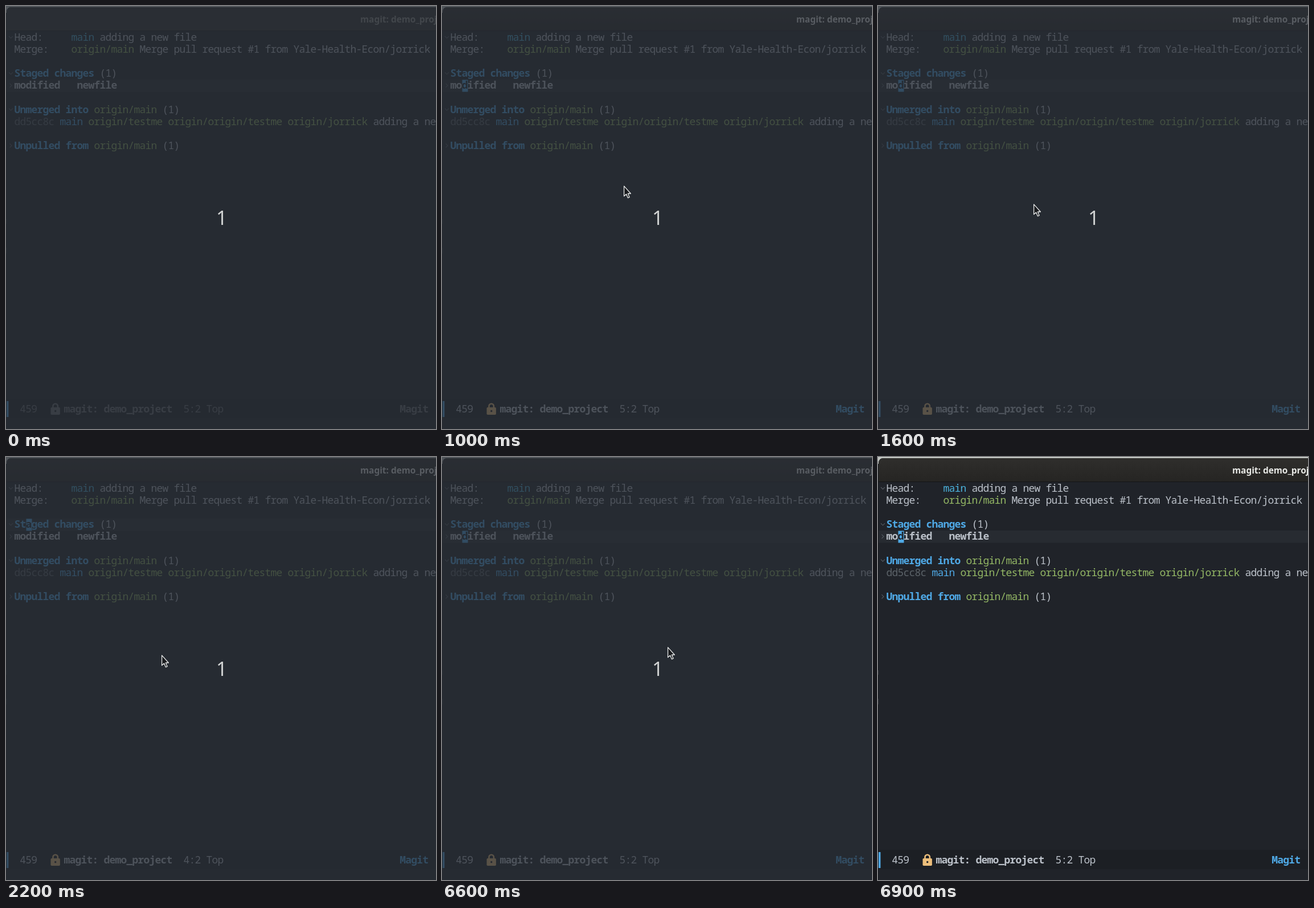
These frames come from a looping animation (755x742 px, 8000 ms). An HTML page:

```html
<!DOCTYPE html>
<html lang="en">
<head>
<meta charset="utf-8">
<title>magit status</title>
<style>
  html, body { margin: 0; width: 100%; height: 100%; overflow: hidden; background: #16191d; }
  svg { display: block; width: 755px; height: 742px; }
  text { white-space: pre; font: 500 18px "Noto Sans Mono", "DejaVu Sans Mono", monospace; letter-spacing: -.8px; }
  text.bold { font-weight: 700; }
  text.title { font: 600 15.4px "Noto Sans", "Open Sans", sans-serif; letter-spacing: 0; }
  text.count { font: 34px "Noto Sans", "Open Sans", sans-serif; letter-spacing: 0; }
</style>
</head>
<body>
<svg id="stage" viewBox="0 0 755 742" xmlns="http://www.w3.org/2000/svg">
  <defs>
    <linearGradient id="bar" x2="0" y2="1">
      <stop offset="0" stop-color="#2f2e2c"/>
      <stop offset="1" stop-color="#262523"/>
    </linearGradient>
  </defs>
  <rect width="755" height="742" fill="#16191d"/>
  <rect width="755" height="12" fill="#c4c8c4"/>
  <path d="M1 742V11Q1 2 10 2H755V742Z" fill="#202329"/>
  <path d="M1 43V11Q1 2 10 2H755V43Z" fill="url(#bar)"/>
  <path id="unfocused" d="M1 43V11Q1 2 10 2H755V43Z" fill="#31312f"/>
  <rect x="1" y="43" width="754" height="1" fill="#141517"/>
  <path d="M0 374v8M0 424v10" stroke="#4a4e52"/>
  <rect id="line" x="1" y="129" width="754" height="21.5" fill="#272b31"/>
  <rect x="1" y="689" width="754" height="34" fill="#1c1f24"/>
  <rect x="1" y="693" width="3.5" height="28" fill="#4fa9e6"/>
  <g id="fringe" fill="none" stroke="#565c63" stroke-width="1.1"></g>
  <g id="text"></g>
  <rect id="cursor" x="35.5" y="129.5" width="10" height="21" fill="#4fa9e6"/>
  <text id="under" class="bold" x="34.6" fill="#202329"></text>
  <g id="lock">
    <path d="M82.5 706V702a4.2 4.2 0 0 1 8.4 0V706" fill="none" stroke="currentColor" stroke-width="2.6"/>
    <rect x="78.5" y="704" width="16.4" height="13" rx="1.8" fill="currentColor"/>
    <circle cx="86.7" cy="710.5" r="1.7" fill="#1c1f24"/>
  </g>
  <g id="veil">
    <rect width="755" height="742" fill="rgb(41,46,54)" fill-opacity=".75"/>
    <text class="count" x="369" y="383.8" fill="#d0d2d2">1</text>
  </g>
  <path id="pointer" d="M.6.9V18.6L4.6 15 7.4 21.6 10.2 20.4 7.4 14H12.4Z"
        fill="#191b1e" stroke="#e6e8e8" stroke-width="1.3" stroke-linejoin="round"/>
</svg>
<script>
const NS = 'http://www.w3.org/2000/svg';
const $ = id => document.getElementById(id);
const FG = '#bcc2ca', BLUE = '#4fa9e6', GREEN = '#94b865', GREY = '#5b6268', OFF = '#666a70';
const LOOP = 8000;

function put(x, y, str, fill = FG, cls = '') {
  const el = document.createElementNS(NS, 'text');
  el.setAttribute('x', x);
  el.setAttribute('y', y);
  el.setAttribute('fill', fill);
  el.setAttribute('class', cls);
  el.textContent = str;
  return $('text').appendChild(el);
}

const rowY = row => 61 + 21.1 * row;

// Each part: column, text, colour, class
function row(n, ...parts) {
  for (const [col, ...rest] of parts) put(14.6 + col * 10, rowY(n), ...rest);
}

row(0, [0, 'Head:'], [10, 'main', '#4bb2dc'], [15, 'adding a new file']);
row(1, [0, 'Merge:'], [10, 'origin/main', GREEN],
       [22, 'Merge pull request #1 from Yale-Health-Econ/jorrick']);
row(3, [0, 'Staged changes', BLUE, 'bold'], [15, '(1)']);
row(4, [0, 'modified', FG, 'bold'], [11, 'newfile', FG, 'bold']);
row(6, [0, 'Unmerged into', BLUE, 'bold'], [14, 'origin/main', GREEN], [26, '(1)']);
row(7, [0, 'dd5cc8c', GREY], [8, 'main', BLUE], [13, 'origin/testme', GREEN],
       [27, 'origin/origin/testme', GREEN], [48, 'origin/jorrick', GREEN],
       [63, 'adding a new file']);
row(9, [0, 'Unpulled from', BLUE, 'bold'], [14, 'origin/main', GREEN], [26, '(1)']);

const folds = [[0, 1], [3, 1], [4, 0], [6, 1], [9, 0]];
for (const [n, open] of folds) {
  const path = document.createElementNS(NS, 'path');
  const y = rowY(n) - 6;
  path.setAttribute('d', open ? `M5 ${y - 2}l3.5 3.5 3.5 -3.5` : `M6.5 ${y - 3.5}l3.5 3.5 -3.5 3.5`);
  $('fringe').append(path);
}

const title = put(622, 28.8, 'magit: demo_project', FG, 'title');
const size = put(24.2, 713, '459');
const buffer = put(101.6, 713, 'magit: demo_project', FG, 'bold');
const place = put(311.6, 713, '5:2 Top');
const mode = put(691.2, 713, 'Magit', BLUE, 'bold');

// Pointer stops: time, x, y; no position means hidden
const stops = [
  [0], [900, 392, 198], [1000, 319, 315], [1100, 301, 329], [1200, 289, 338],
  [1300, 280, 344], [1400, 274, 348], [1600, 273, 347],
  [6600, 396, 333], [6700, 506, 173], [6800, 616, 13], [6900]
];

const show = (el, on) => el.setAttribute('visibility', on ? 'visible' : 'hidden');
const paint = (el, fill) => el.setAttribute('fill', fill);

function render(t) {
  const focus = t < 300 ? 0 : t < 400 ? 0.5 : 1;
  $('unfocused').setAttribute('opacity', 1 - focus);
  paint(title, ['#8e908d', '#babbb8', '#e8e9e6'][focus * 2]);

  const named = t >= 300, active = t >= 900;
  $('lock').style.color = named ? '#ecbe7b' : OFF;
  paint(buffer, named ? FG : OFF);
  paint(size, active ? FG : OFF);
  paint(place, active ? FG : OFF);
  paint(mode, active ? BLUE : OFF);

  const up = t >= 2200 && t < 2600;
  place.textContent = (up ? '4' : '5') + ':2 Top';
  $('line').setAttribute('y', up ? 108 : 129);
  $('cursor').setAttribute('y', up ? 108.4 : 129.5);
  $('under').setAttribute('y', rowY(up ? 3 : 4));
  $('under').textContent = up ? 'a' : 'd';
  show($('cursor'), focus > 0);
  show($('under'), focus > 0);

  show($('veil'), t < 6900);
  const [, x, y] = stops.filter(s => s[0] <= t).pop();
  show($('pointer'), x !== undefined);
  if (x !== undefined) $('pointer').setAttribute('transform', `translate(${x} ${y})`);
}

const start = performance.now();
function tick() {
  render((performance.now() - start) % LOOP);
  requestAnimationFrame(tick);
}
tick();
</script>
</body>
</html>
```
